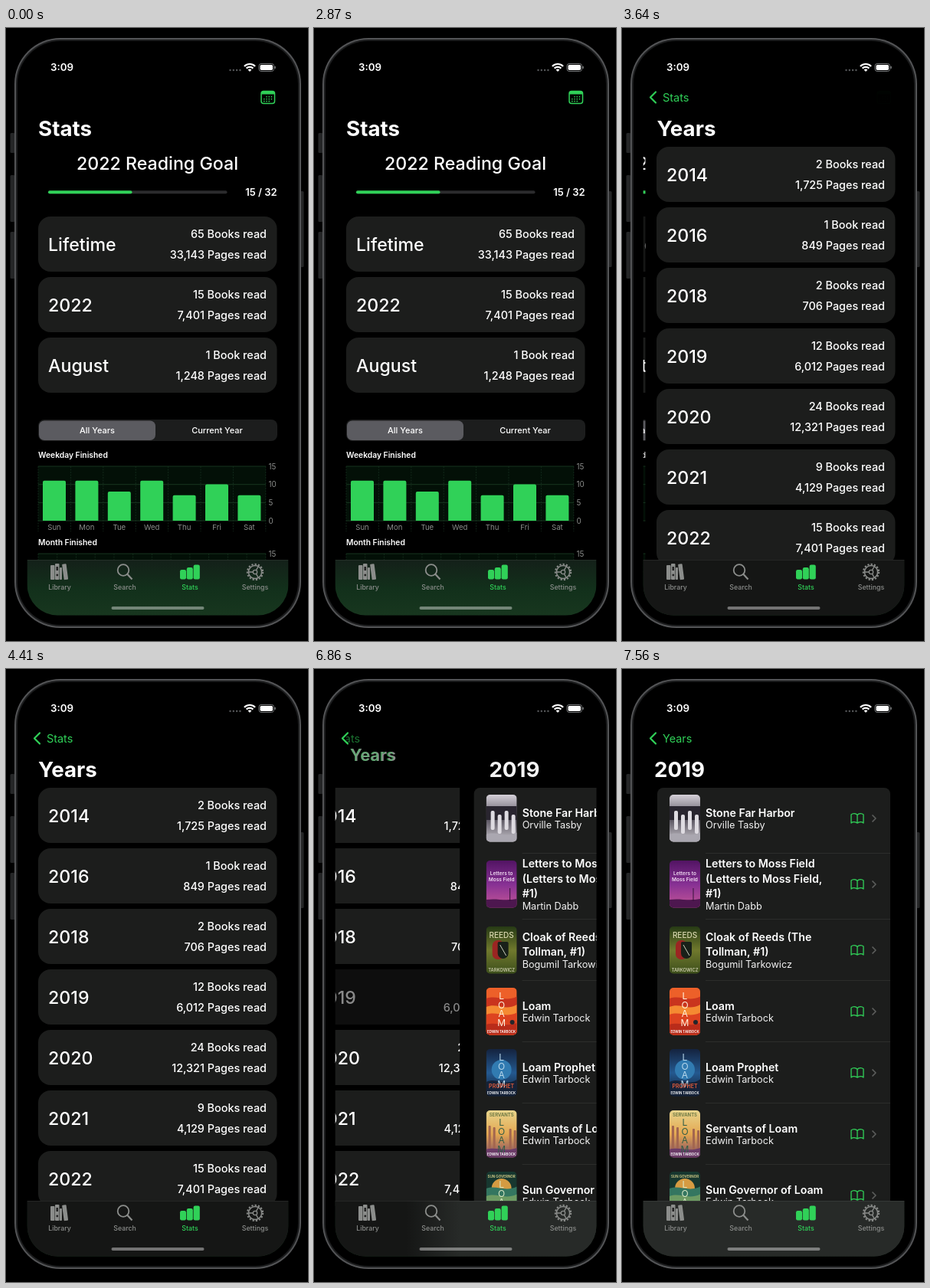
These frames come from a looping animation (394x800 px, 8 s). An HTML page with a canvas:

```html
<!DOCTYPE html>
<html lang="en">
<head>
<meta charset="utf-8">
<title>Reading stats</title>
<style>
html, body { margin: 0; width: 100%; height: 100%; overflow: hidden; background: #000; }
canvas { display: block; width: 394px; height: 800px; }
</style>
</head>
<body>
<canvas id="stage"></canvas>
<script>
const canvas = document.getElementById('stage');
const dpr = window.devicePixelRatio || 1;
canvas.width = 394 * dpr;
canvas.height = 800 * dpr;
const c = canvas.getContext('2d');

const LOOP = 8000, STEP = 70;
const GREEN = '#30d158', CARD = '#1c1d1c', WHITE = '#fff', GREY = '#8b8d8b';
const LEFT = 27.5, TOP = 28, WIDTH = 341, BAR = 694;
const PUSH_YEARS = 3268, PUSH_BOOKS = 6764, TITLE_LAG = 12;

const clamp = v => Math.max(0, Math.min(1, v));
const mix = (a, b, k) => a + (b - a) * k;

// Critically damped spring from 0 to 1
function spring(ms) {
  if (ms <= 0) return 0;
  const x = ms * 0.01826;
  return ms > 760 ? 1 : 1 - (1 + x) * Math.exp(-x);
}

function text(s, x, y, size, weight = 400, color = WHITE, align = 'left') {
  c.font = `${weight} ${size}px Inter, "Liberation Sans", sans-serif`;
  c.textAlign = align;
  c.fillStyle = color;
  c.fillText(s, x, y + size * 0.36);
}

function box(x, y, w, h, r, color) {
  c.fillStyle = color;
  c.beginPath();
  c.roundRect(x, y, w, h, r);
  c.fill();
}

function line(points, color, width) {
  c.strokeStyle = color;
  c.lineWidth = width;
  c.beginPath();
  points.forEach(([x, y], i) => i ? c.lineTo(x, y) : c.moveTo(x, y));
  c.stroke();
}

function ring(x, y, r, color, width) {
  c.strokeStyle = color;
  c.lineWidth = width;
  c.beginPath();
  c.arc(x, y, r, 0, Math.PI * 2);
  c.stroke();
}

function dot(x, y, r, color) {
  c.fillStyle = color;
  c.beginPath();
  c.arc(x, y, r, 0, Math.PI * 2);
  c.fill();
}

function layer(draw) {
  c.save();
  draw();
  c.restore();
}

function clipBox(x, y, w, h, r = 0) {
  c.beginPath();
  c.roundRect(x, y, w, h, r);
  c.clip();
}

function fade(alpha, draw) {
  if (alpha > 0) layer(() => { c.globalAlpha *= alpha; draw(); });
}

function card(y, label, books, pages, alpha = 1) {
  fade(alpha, () => {
    box(42, y, 311.5, 72, 16, CARD);
    text(label, 55, y + 36.5, 23.2, 500);
    text(`${books} Book${books === 1 ? '' : 's'} read`, 340, y + 23, 14.4, 500, WHITE, 'right');
    text(`${pages} Pages read`, 340, y + 49.5, 14.4, 500, WHITE, 'right');
  });
}

function chart(title, y, columns, labels, values) {
  const pitch = 296.8 / columns;
  text(title, 42, y - 15, 10.3, 600);
  box(42, y, 297, 71, 0, '#031007');
  c.setLineDash([2, 1.5]);
  for (let i = 0; i <= columns; i++) {
    const x = 42 + i * pitch;
    line([[x, y], [x, y + 85]], '#173020', 0.8);
  }
  c.setLineDash([]);
  for (let i = 0; i < 4; i++) {
    const gy = y + i * 23.7;
    line([[42, gy], [339, gy]], '#17351f', 1);
    text(String(15 - i * 5), 342.5, gy, 9.8, 400, GREY);
  }
  values.forEach((v, i) => {
    const x = 42 + pitch * i + 6, h = v * 4.74;
    box(x, y + 71 - h, 30, h, [2, 2, 0, 0], GREEN);
    text(labels[i], x + 15, y + 80, 9.6, 400, GREY, 'center');
  });
}

function statsPage(dim) {
  text('2022 Reading Goal', 197.5, 177, 23.2, 500, WHITE, 'center');
  box(55, 212.3, 233.5, 4, 2, '#2b2b2d');
  box(55, 212.3, 109.5, 4, 2, GREEN);
  text('15 / 32', 353.5, 214.5, 13, 600, WHITE, 'right');
  card(246, 'Lifetime', 65, '33,143', dim);
  card(325, '2022', 15, '7,401');
  card(404, 'August', 1, '1,248');
  box(42, 511, 312, 28, 8, '#1c1d1d');
  box(43, 512.5, 152, 25.5, 7, '#5b5b60');
  text('All Years', 119, 525.5, 11, 500, WHITE, 'center');
  text('Current Year', 275.5, 525.5, 11, 500, WHITE, 'center');
  chart('Weekday Finished', 572, 7,
    ['Sun', 'Mon', 'Tue', 'Wed', 'Thu', 'Fri', 'Sat'], [11, 11, 8, 11, 7, 10, 7]);
  chart('Month Finished', 686, 12, [], []);
}

const YEARS = [
  ['2014', 2, '1,725'], ['2016', 1, '849'], ['2018', 2, '706'], ['2019', 12, '6,012'],
  ['2020', 24, '12,321'], ['2021', 9, '4,129'], ['2022', 15, '7,401']
];

function yearsPage(dim) {
  YEARS.forEach(([year, books, pages], i) =>
    card(155 + 79 * i, year, books, pages, year === '2019' ? dim : 1));
}

function gradient(y, h, colors) {
  const g = c.createLinearGradient(0, y, 0, y + h);
  colors.forEach((k, i) => g.addColorStop(i / (colors.length - 1), k));
  return g;
}

function hill(y, color, bend) {
  c.fillStyle = color;
  c.beginPath();
  c.moveTo(0, y);
  c.bezierCurveTo(14, y - bend, 24, y + bend, 40, y - bend / 2);
  c.lineTo(40, 62);
  c.lineTo(0, 62);
  c.fill();
}

function stacked(color) {
  [...'LOAM'].forEach((s, i) => text(s, 20, 11 + i * 11.5, 12, 400, color, 'center'));
}

const COVERS = [
  () => {
    box(0, 0, 40, 62, 0, gradient(0, 62, ['#d5d0d8', '#55505c', '#c9c6cc']));
    box(0, 15, 40, 18, 0, '#29252f');
    [6, 15, 24, 33].forEach((x, i) => box(x, 21 + i % 2 * 5, 5, 25, 2, '#dedbe1'));
    hill(52, '#aaa7b0', 5);
  },
  () => {
    box(0, 0, 40, 62, 0, gradient(0, 62, ['#521463', '#873194', '#c65797']));
    text('Letters to', 20, 17, 6.5, 600, '#f4dff5', 'center');
    text('Moss Field', 20, 25, 6.5, 600, '#f4dff5', 'center');
    hill(51, '#4d174f', 2);
    line([[31, 36], [31, 53]], '#361238', 1);
  },
  () => {
    box(0, 0, 40, 62, 0, gradient(0, 62, ['#263a15', '#70792d', '#3c4e1b']));
    box(8, 18, 15, 25, 7, '#9b2522');
    box(15, 20, 14, 22, [2, 2, 8, 8], '#182019');
    line([[18, 24], [26, 38]], '#cbd0bd', 1);
    text('REEDS', 20, 11, 10, 500, '#d9d7b0', 'center');
    text('TARKOWICZ', 20, 57, 5.8, 500, '#dad9bb', 'center');
  },
  () => {
    box(0, 0, 40, 62, 0, '#ed6029');
    hill(14, '#c9341e', 5);
    hill(25, '#f58a32', 6);
    hill(35, '#dd4320', 5);
    hill(48, '#b92c1a', 4);
    stacked('#fff3df');
    dot(34, 45, 3, '#24262b');
    text('EDWIN TARBOCK', 20, 57, 4.4, 600, '#fff', 'center');
  },
  () => {
    box(0, 0, 40, 62, 0, gradient(0, 62, ['#14233f', '#245990', '#101b2c']));
    dot(20, 27, 13, '#317bb1');
    hill(43, '#152238', 7);
    stacked('#b8d8ec');
    text('PROPHET', 20, 48, 7, 600, '#e45c3b', 'center');
    text('EDWIN TARBOCK', 20, 57, 4.4, 600, '#fff', 'center');
  },
  () => {
    box(0, 0, 40, 62, 0, gradient(0, 62, ['#e7d48c', '#e4a851', '#7a4567']));
    [3, 9, 30, 36].forEach((x, i) => box(x, 20 + i * 2, 3, 34, 1, '#a3664f'));
    hill(51, '#6b3c68', 4);
    text('SERVANTS', 20, 6, 6, 600, '#61713d', 'center');
    layer(() => { c.translate(0, 5); stacked('#315d47'); });
    text('EDWIN TARBOCK', 20, 57, 4.4, 600, '#fff', 'center');
  },
  () => {
    box(0, 0, 40, 62, 0, '#17372f');
    dot(20, 22, 13, '#d59b42');
    hill(22, '#347660', 5);
    hill(32, '#6d9b63', 5);
    text('SUN GOVERNOR', 20, 6, 4.5, 600, '#dfd58d', 'center');
    layer(() => { c.translate(0, 6); stacked('#d9e8c5'); });
  }
];

// Cover top, lines of the title, author
const BOOKS = [
  [164, ['Stone Far Harbor'], 'Orville Tasby'],
  [250, ['Letters to Moss Field', '(Letters to Moss Field,', '#1)'], 'Martin Dabb'],
  [336, ['Cloak of Reeds (The', 'Tollman, #1)'], 'Bogumil Tarkowicz'],
  [416, ['Loam'], 'Edwin Tarbock'],
  [496, ['Loam Prophet'], 'Edwin Tarbock'],
  [576, ['Servants of Loam'], 'Edwin Tarbock'],
  [656, ['Sun Governor of Loam'], 'Edwin Tarbock']
];

function bookIcon(x, y) {
  c.strokeStyle = GREEN;
  c.lineWidth = 1.3;
  c.lineJoin = 'round';
  c.beginPath();
  for (const s of [-1, 1]) {
    c.moveTo(x, y - 4.5);
    c.bezierCurveTo(x + s * 2, y - 7, x + s * 6, y - 6.8, x + s * 8, y - 5);
    c.lineTo(x + s * 8, y + 6);
    c.bezierCurveTo(x + s * 6, y + 4.2, x + s * 2, y + 4.2, x, y + 6.3);
  }
  c.moveTo(x, y - 4.5);
  c.lineTo(x, y + 6.3);
  c.stroke();
}

function booksPage() {
  box(46, 155, 304, 600, 8, CARD);
  BOOKS.forEach(([y, title, author], i) => {
    layer(() => {
      clipBox(62, y, 40, 61.5, 5);
      c.translate(62, y);
      COVERS[i]();
    });
    const mid = y + 31, first = mid - 7.5 - (title.length - 1) * 9.6;
    title.forEach((s, k) => text(s, 109, first + k * 19.2, 14.2, 600));
    text(author, 109, first + (title.length - 1) * 19.2 + 16.3, 12.7, 400, '#f2f2f2');
    bookIcon(307, mid);
    line([[326.5, mid - 4.5], [331, mid], [326.5, mid + 4.5]], '#5c5e5c', 1.6);
    if (i) line([[109, y - 9.5], [350, y - 9.5]], '#30322f', 0.8);
  });
}

function calendarIcon() {
  c.strokeStyle = GREEN;
  c.lineWidth = 1.5;
  c.beginPath();
  c.roundRect(333, 82.5, 17.5, 16, 3);
  c.stroke();
  box(333, 82.5, 17.5, 4, [3, 3, 0, 0], GREEN);
  for (let i = 1; i < 11; i++)
    box(336 + i % 4 * 3.2, 89 + Math.floor(i / 4) * 2.9, 1.6, 1.6, 0.4, GREEN);
}

function chevron() {
  c.lineCap = c.lineJoin = 'round';
  line([[44, 83.5], [37, 90.5], [44, 97.5]], GREEN, 2.2);
}

// Large title shrinking into the back label
function titleToBack(s, q) {
  const x = mix(42, 53, q), y = mix(131, 90.5, q), size = mix(27.7, 14.4, q);
  fade(1 - q, () => text(s, x, y, size, 700));
  fade(q, () => text(s, x, y, size, 400, GREEN));
}

function newTitle(s, q) {
  fade(clamp(q * 2.1), () => text(s, 42 + WIDTH * (1 - q), 131, 27.7, 700));
}

function navBar(q1, q2) {
  fade(1 - q1, calendarIcon);
  fade(clamp(q1 * 2 - 1), chevron);
  if (q2 === 0) {
    titleToBack('Stats', q1);
    newTitle('Years', q1);
    return;
  }
  fade(1 - q2, () => {
    clipBox(42, 75, 200, 30);
    text('Stats', 53 - 60 * q2, 90.5, 14.4, 400, GREEN);
  });
  titleToBack('Years', q2);
  newTitle('2019', q2);
}

function push(before, after, p) {
  const edge = WIDTH * (1 - p);
  if (p < 1) layer(() => {
    clipBox(LEFT, TOP, edge, 740);
    c.translate(-0.3 * WIDTH * p, 0);
    before();
  });
  if (p > 0) layer(() => {
    clipBox(LEFT + edge, TOP, WIDTH, 740);
    c.translate(edge, 0);
    after();
  });
}

function barTint(color, p) {
  if (p <= 0) return;
  const e = LEFT + WIDTH * (1 - p), g = c.createLinearGradient(e - 70 * Math.min(1, p * 4), 0, e, 0);
  g.addColorStop(0, color + '00');
  g.addColorStop(1, color);
  c.fillStyle = g;
  c.fillRect(LEFT, BAR, WIDTH, 75);
}

function tabBar(p1, p2) {
  box(LEFT, BAR, WIDTH, 75, 0, gradient(BAR, 75, ['#142019', '#12301b', '#18371f']));
  barTint('#151615', p1);
  barTint('#272a28', p2);
  box(LEFT, BAR, WIDTH, 0.8, 0, 'rgba(255,255,255,.09)');

  box(58, 701, 5.5, 19, 1, GREY);
  box(64, 699, 5.5, 21, 1, GREY);
  box(65.5, 703, 2.5, 5, 0.5, '#222');
  dot(66.8, 714, 1.4, '#222');
  box(70, 704, 3, 16, 1, GREY);
  layer(() => {
    c.translate(77, 710);
    c.rotate(-0.13);
    box(-2.6, -10.5, 5.5, 20.5, 1, GREY);
  });

  ring(153, 707.5, 7.3, GREY, 1.8);
  line([[158.3, 712.8], [164.5, 719.5]], GREY, 2.2);

  box(227, 707, 8, 12.5, 2.2, GREEN);
  box(235.8, 704, 8, 15.5, 2.2, GREEN);
  box(244.6, 700.5, 8.2, 19, 2.2, GREEN);

  ring(325, 710, 8.6, GREY, 1.5);
  c.setLineDash([2.2, 2.1]);
  ring(325, 710, 10.2, GREY, 2);
  c.setLineDash([]);
  ring(325, 710, 2.7, GREY, 1.2);
  for (let i = 0; i < 3; i++) {
    const a = i * Math.PI * 2 / 3 + Math.PI, x = Math.cos(a), y = Math.sin(a);
    line([[325 + x * 2.7, 710 + y * 2.7], [325 + x * 8.6, 710 + y * 8.6]], GREY, 1.3);
  }

  ['Library', 'Search', 'Stats', 'Settings'].forEach((s, i) =>
    text(s, 70 + i * 85, 730, 8.8, 500, i === 2 ? GREEN : GREY, 'center'));
  box(137.5, 755, 121, 4, 2, 'rgba(255,255,255,.4)');
}

function statusBar() {
  text('3:09', 58, 51.5, 13.3, 600);
  for (let i = 0; i < 4; i++) dot(292.5 + i * 4.3, 55, 1.2, '#56585a');
  c.lineCap = 'butt';
  for (const r of [10, 6.2]) {
    c.strokeStyle = WHITE;
    c.lineWidth = 2.2;
    c.beginPath();
    c.arc(318, 57, r, -Math.PI * 0.75, -Math.PI * 0.25);
    c.stroke();
  }
  c.fillStyle = WHITE;
  c.beginPath();
  c.moveTo(318, 57);
  c.arc(318, 57, 3.4, -Math.PI * 0.75, -Math.PI * 0.25);
  c.fill();
  c.strokeStyle = '#77797b';
  c.lineWidth = 1;
  c.beginPath();
  c.roundRect(330, 46.5, 19.5, 10, 3);
  c.stroke();
  box(331.5, 48, 16.5, 7, 1.8, WHITE);
  box(350.5, 49.7, 1.4, 3.6, 0.7, '#77797b');
}

function phone() {
  for (const [y, h] of [[137, 26], [192, 61], [266, 61]]) box(5.5, y, 6, h, 1.5, '#252627');
  box(384, 213, 4.5, 99, 1.5, '#252627');
  box(11, 13, 374, 770, 60, '#535456');
  box(13, 15, 370, 766, 58, '#1c1d1e');
  box(15, 17, 366, 762, 56, '#000');
}

function draw(t) {
  const p1 = spring(t - PUSH_YEARS), p2 = spring(t - PUSH_BOOKS);
  const q1 = spring(t - PUSH_YEARS - TITLE_LAG), q2 = spring(t - PUSH_BOOKS - TITLE_LAG);
  const dim = start => t < start ? 1 : mix(0.42, 1, clamp((t - start) / 600));

  c.setTransform(dpr, 0, 0, dpr, 0, 0);
  c.fillStyle = '#000';
  c.fillRect(0, 0, 394, 800);
  phone();
  layer(() => {
    clipBox(LEFT, TOP, WIDTH, 738.5, 40);
    if (p2 > 0) push(() => yearsPage(dim(PUSH_BOOKS)), booksPage, p2);
    else push(() => statsPage(dim(PUSH_YEARS)), () => yearsPage(1), p1);
    navBar(q1, q2);
    tabBar(p1, p2);
    statusBar();
  });
}

const begin = performance.now();
function tick() {
  const t = (performance.now() - begin) % LOOP;
  draw(Math.floor(t / STEP) * STEP);
  requestAnimationFrame(tick);
}
tick();
</script>
</body>
</html>
```
